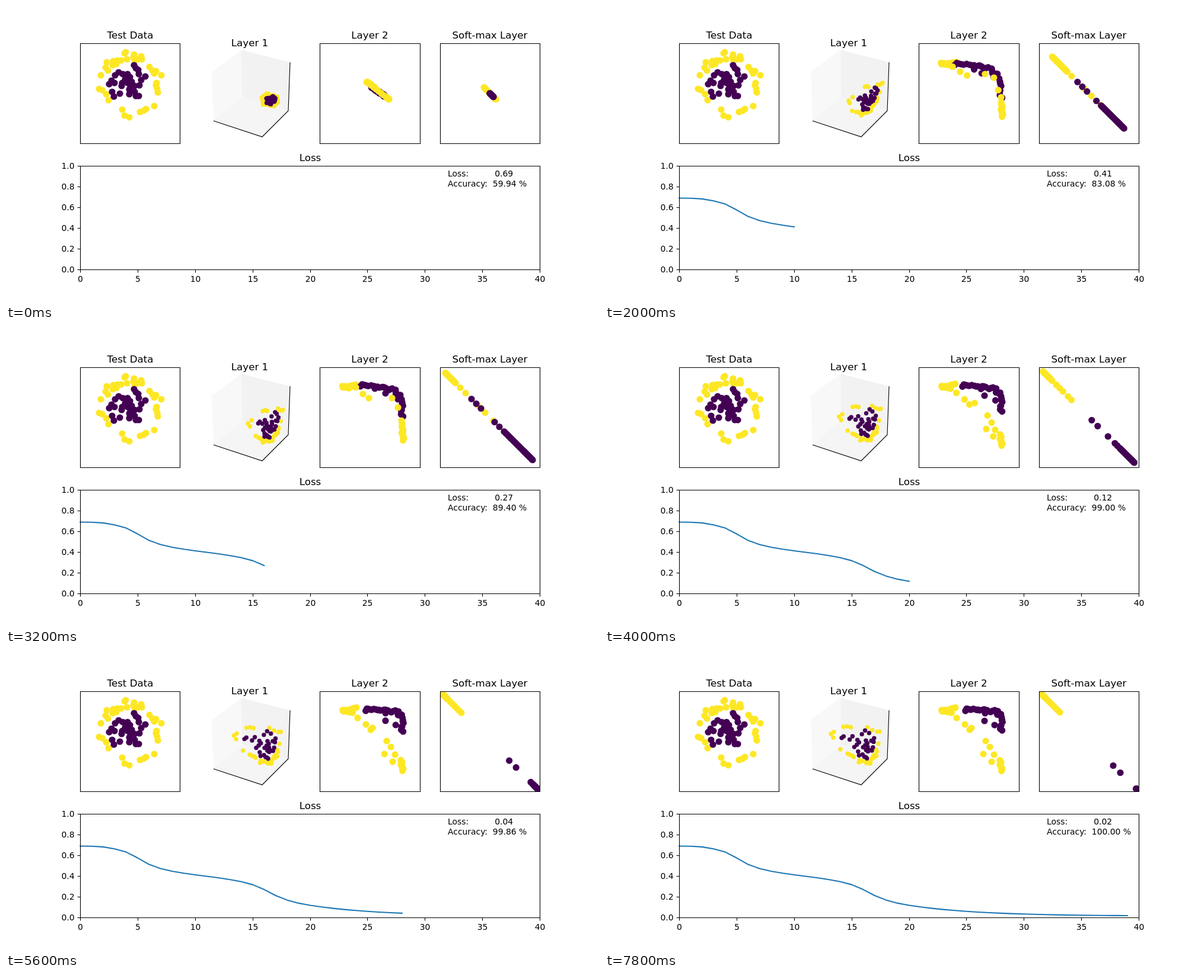
These frames come from a looping animation (1000 by 500 pixels, 8000 ms). An HTML page:

```html
<!DOCTYPE html>
<html lang="en">
<head>
<meta charset="utf-8">
<title>Training a small network</title>
<style>
  html, body { margin: 0; width: 100%; height: 100%; overflow: hidden; background: #fff; }
  svg { display: block; width: 100vw; height: 100vh; }
  text { font: 13.89px "DejaVu Sans", sans-serif; white-space: pre; }
  .title { font-size: 16.67px; text-anchor: middle; }
  .x { text-anchor: middle; }
  .y { text-anchor: end; }
  .frame { fill: none; stroke: #000; stroke-width: 1.1; }
  .yellow { fill: #fde725; }
  .purple { fill: #440154; }
</style>
</head>
<body>
<svg viewBox="0 0 1000 500">
  <clipPath id="clip2"><rect x="529.5" y="63.5" width="169" height="169"/></clipPath>
  <clipPath id="clip3"><rect x="732.5" y="63.5" width="168" height="169"/></clipPath>

  <path fill="#f8f8f8" d="M397 74L347 111L350 194L398 153Z"/>
  <path fill="#f2f2f2" d="M397 74L479 95L476 177L398 153Z"/>
  <path fill="#f5f5f5" d="M398 153L350 194L432 221L476 177Z"/>
  <path class="frame" d="M350 194L432 221L476 177L479 95"/>

  <g id="data"></g>
  <g id="layer1"></g>
  <g id="layer2" clip-path="url(#clip2)"></g>
  <g id="softmax" clip-path="url(#clip3)"></g>

  <polyline id="curve" fill="none" stroke="#1f77b4" stroke-width="2.08" stroke-linecap="square" stroke-linejoin="round"/>
  <path class="frame" d="M125.5 63.5h168v169h-168zM529.5 63.5h169v169h-169zM732.5 63.5h168v169h-168zM125.5 270.5h775v175h-775z"/>
  <g id="ticks"></g>

  <text class="title" x="209.5" y="55">Test Data</text>
  <text class="title" x="411" y="68">Layer 1</text>
  <text class="title" x="613.5" y="55">Layer 2</text>
  <text class="title" x="816" y="55">Soft-max Layer</text>
  <text class="title" x="513" y="262">Loss</text>
  <text id="loss" x="745" y="288"></text>
  <text id="accuracy" x="745" y="305"></text>
</svg>
<script>
const STEP_MS = 200, STEPS = 40;
const KEY_STEPS = [0, 6, 16, 39];
const ACCURACY = [[0, 59.94], [6, 81], [10, 83.08], [16, 89.4], [20, 99], [28, 99.86], [39, 100]];
const EARLY_LOSS = [.69, .688, .682, .663, .632, .575, .512, .472, .447, .428,
  .412, .398, .383, .366, .346, .317, .27, .212, .168, .138];
const lossAt = i => EARLY_LOSS[i] ?? .012 + .105 * Math.exp((20 - i) / 6.2);

const RING = [202,78, 200,80, 216,82, 228,85, 229,90, 215,87, 204,90, 217,92, 222,90,
  170,95, 181,93, 188,92, 194,92, 180,100, 186,98, 168,104, 172,109, 160,117,
  242,103, 247,109, 253,110, 250,114, 262,117, 254,130, 253,134, 255,140, 256,146,
  250,169, 236,174, 232,177, 226,179, 208,188, 200,185, 196,175,
  173,159, 169,149, 162,142, 157,140];
const CORE = [216,100, 219,105, 223,108, 224,115, 235,119, 228,125, 225,134,
  190,112, 184,117, 197,115, 205,115, 209,120, 201,124, 178,126, 174,132, 183,130,
  196,130, 195,135, 205,130, 212,128, 210,137, 208,141, 217,145, 208,149, 219,152,
  224,152, 192,148, 179,145, 182,153, 217,135];

// Layer 1 is a smooth warp of the data, steered by a few anchors.
const ANCHORS = pairs([208,188, 232,177, 250,169, 262,117, 202,78, 169,96, 157,140, 173,158, 222,152, 208,130]);
const ANCHOR_POSES = [
  ANCHORS.map(([x, y]) => [
    445 - .25 * (x - 209) - .1 * (y - 132),
    159 + .08 * (x - 209) - .2 * (y - 132)]),
  pairs([444,136, 414,162, 412,175, 431,179, 447,166, 458,147, 469,124, 461,133, 431,156, 442,157]),
  pairs([433,137, 408,158, 421,179, 433,190, 449,187, 459,173, 467,135, 459,133, 426,156, 443,165]),
  pairs([402,123, 381,135, 397,161, 428,183, 447,185, 458,172, 463,131, 443,124, 399,140, 438,155])];

const byId = id => document.getElementById(id);
const lerp = (a, b, t) => a + (b - a) * t;

function pairs(flat) {
  return Array.from({ length: flat.length / 2 }, (_, i) => [flat[2 * i], flat[2 * i + 1]]);
}

function add(parent, tag, attrs, text = "") {
  const node = document.createElementNS("http://www.w3.org/2000/svg", tag);
  for (const name in attrs) node.setAttribute(name, attrs[name]);
  node.textContent = text;
  parent.append(node);
  return node;
}

const addDot = (id, color, r) => add(byId(id), "circle", { class: color, r });

function place(dot, x, y) {
  dot.setAttribute("cx", x.toFixed(2));
  dot.setAttribute("cy", y.toFixed(2));
}

let seed = 7;
function noise() {
  seed = seed * 16807 % 2147483647;
  return seed / 1073741823.5 - 1;
}

// Gaussian elimination with pivoting
function solve(matrix, rhs) {
  const rows = matrix.map((row, i) => [...row, rhs[i]]);
  const n = rows.length;
  for (let c = 0; c < n; c++) {
    let p = c;
    for (let r = c + 1; r < n; r++) if (Math.abs(rows[r][c]) > Math.abs(rows[p][c])) p = r;
    [rows[c], rows[p]] = [rows[p], rows[c]];
    for (let r = 0; r < n; r++) {
      if (r === c) continue;
      const f = rows[r][c] / rows[c][c];
      for (let k = c; k <= n; k++) rows[r][k] -= f * rows[c][k];
    }
  }
  return rows.map((row, i) => row[n] / row[i]);
}

const kernel = ([x, y]) => [...ANCHORS.map(([u, v]) => Math.hypot(x - u, y - v)), 1];
const system = [...ANCHORS.map(kernel), [...ANCHORS.map(() => 1), 0]];

// Each mover has one position per key step; rate is how fast it settles at the end.
const movers = [];

for (const [color, flat] of [["yellow", RING], ["purple", CORE]]) {
  for (const point of pairs(flat)) {
    place(addDot("data", color, 5.6), ...point);
    const weights = solve(system, kernel(point));
    const poses = ANCHOR_POSES.map(pose => [0, 1].map(axis =>
      pose.reduce((sum, p, i) => sum + weights[i] * p[axis], 0)));
    movers.push({ node: addDot("layer1", color, 3.7), poses, rate: 6 });
  }
}

function along(path, at) {
  const last = path.length - 1;
  const i = Math.min(Math.floor(at * last + 1e-9), last - 1);
  return [0, 1].map(axis => lerp(path[i][axis], path[i + 1][axis], at * last - i));
}

// Spreads dots evenly along a path, given once per key step.
function strand(id, color, count, jitter, rate, ...paths) {
  for (let n = 0; n < count; n++) {
    const shift = [noise() * jitter, noise() * jitter];
    const poses = paths.map((path, k) =>
      along(path, n / (count - 1)).map((v, axis) => v + shift[axis] * (k ? 1 : .5)));
    movers.push({ node: addDot(id, color, 5.6), poses, rate });
  }
}

const layer2 = (color, count, jitter, rate, ...paths) =>
  strand("layer2", color, count, jitter, rate, ...paths.map(pairs));
const softmax = (color, count, rate, ...paths) =>
  strand("softmax", color, count, 0, rate, ...paths.map(xs => xs.map(x => [x, x - 668.5])));

layer2("yellow", 18, 1.6, 3,
  [609,128, 622,138],
  [583,100, 564,99, 596,98],
  [580,97, 566,96, 591,93],
  [586,98, 566,96, 592,91]);
layer2("yellow", 8, 1.6, 2.5,
  [640,153, 646,158],
  [669,168, 670,188],
  [668,165, 670,187],
  [666,180, 669,198]);
layer2("purple", 35, 2.4, 6,
  [616,137, 639,152],
  [580,103, 619,105, 642,111, 660,123, 669,163],
  [597,93, 628,96, 653,101, 666,113, 669,144],
  [607,94, 630,94, 659,97, 668,104, 669,127]);
layer2("purple", 3, 0, 4,
  [622,142, 638,152],
  [623,116, 630,121, 649,124],
  [622,99, 640,107, 661,117],
  [641,100, 640,113, 657,120]);
layer2("yellow", 9, 0, 2.2,
  [612,131, 645,157],
  [582,109, 609,120, 650,110, 668,150, 669,177],
  [590,97, 602,108, 612,115, 651,115, 661,131, 667,153, 668,158, 668,162, 669,168],
  [593,108, 607,119, 615,128, 618,125, 642,147, 649,157, 638,169, 656,170, 652,182]);

softmax("yellow", 30, 6, [806, 826], [769, 802], [741, 758], [736, 743]);
softmax("yellow", 7, 2.5,
  [808, 826],
  [794, 800, 822, 834, 851, 861, 863],
  [766, 775, 795, 808, 822, 849, 864],
  [745, 767]);
softmax("purple", 25, 6, [816, 822], [838, 861], [840, 872, 888], [896, 897]);
softmax("purple", 5, 6,
  [816, 821],
  [810, 842],
  [785, 793, 801, 824, 832],
  [857, 869, 896, 896, 896]);

for (let i = 0; i <= 8; i++) {
  const x = 125.5 + Math.round(i * 96.875);
  add(byId("ticks"), "path", { class: "frame", d: `M${x} 445.5v5` });
  add(byId("ticks"), "text", { class: "x", x, y: 466 }, i * 5);
}
for (let i = 0; i <= 5; i++) {
  const y = 445.5 - i * 35;
  add(byId("ticks"), "path", { class: "frame", d: `M125.5 ${y}h-5` });
  add(byId("ticks"), "text", { class: "y", x: 115.5, y: y + 4.6 }, (i / 5).toFixed(1));
}

function segment(keys, step) {
  let k = 0;
  while (k < keys.length - 2 && step >= keys[k + 1]) k++;
  return [k, (step - keys[k]) / (keys[k + 1] - keys[k])];
}

function ease(k, part, rate) {
  if (k === 0) return part ** 1.6;
  if (k === 1) return part ** .7;
  const span = (KEY_STEPS[3] - KEY_STEPS[2]) / rate;
  return (1 - Math.exp(-part * span)) / (1 - Math.exp(-span));
}

function accuracyAt(step) {
  const [k, part] = segment(ACCURACY.map(([s]) => s), step);
  return lerp(ACCURACY[k][1], ACCURACY[k + 1][1], part);
}

function draw(step) {
  const [k, part] = segment(KEY_STEPS, step);
  for (const { node, poses, rate } of movers) {
    const t = ease(k, part, rate);
    place(node, ...poses[k].map((v, axis) => lerp(v, poses[k + 1][axis], t)));
  }

  const points = Array.from({ length: step + 1 }, (_, i) =>
    `${125.3 + i * 19.375},${445 - lossAt(i) * 174.7}`);
  byId("curve").setAttribute("points", step ? points.join(" ") : "");
  byId("loss").textContent = "Loss:" + " ".repeat(10) + lossAt(step).toFixed(2);
  byId("accuracy").textContent = `Accuracy:  ${accuracyAt(step).toFixed(2)} %`;
}

const start = performance.now();
let shown = -1;
function tick() {
  const step = Math.floor((performance.now() - start) / STEP_MS) % STEPS;
  if (step !== shown) draw(shown = step);
  requestAnimationFrame(tick);
}
tick();
</script>
</body>
</html>
```
